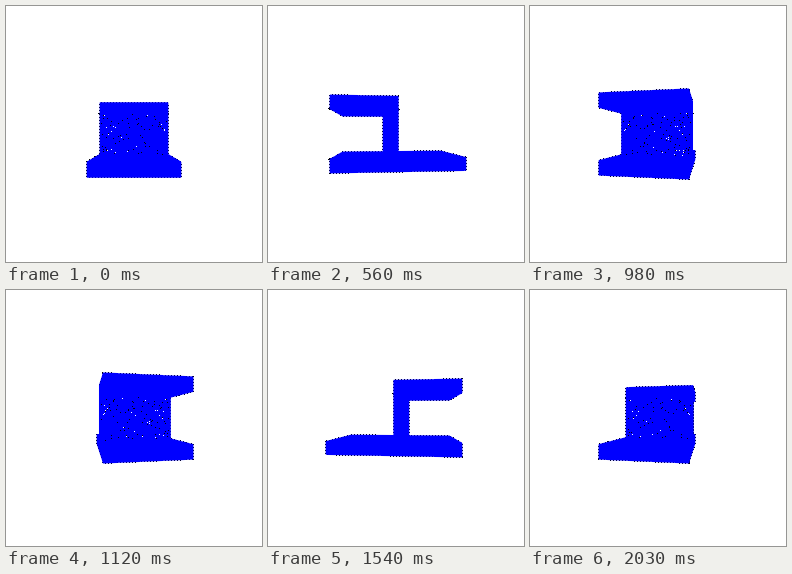
Recreate the animation shown at these times as an HTML page. Size 256 by 256 pixels, loop 2100 ms.

```html
<!DOCTYPE html>
<html lang="en">
<head>
<meta charset="utf-8">
<title>Rotating profile</title>
<style>
html, body { margin: 0; width: 100%; height: 100%; overflow: hidden; background: #fff; }
svg { display: block; width: 100vw; height: 100vh; }
</style>
</head>
<body>
<svg viewBox="0 0 256 256" shape-rendering="crispEdges">
  <path id="fringe" fill="none" stroke="#000" stroke-width="1.7" stroke-dasharray="1 2"/>
  <path id="solid" fill="#00f" stroke="#00f" stroke-width=".8" stroke-linejoin="round"/>
  <path id="dark" fill="#000"/>
  <path id="light" fill="#fff"/>
</svg>
<script>
const STEP_MS = 70, STEPS = 30;
const FOCAL = 212, DISTANCE = 3.75;
const LENGTH = 1.015, WIDTH = 0.605, TOP = 0.56, INNER = 0.36;
const WALL = [0.03, 0.2];

// Each box: [u range, height range, w range]
const boxes = [
  [[-LENGTH, LENGTH], [-TOP, -INNER], [-WIDTH, WIDTH]],
  [WALL, [-INNER, INNER], [-WIDTH, WIDTH]],
  [[WALL[0], LENGTH], [INNER, TOP], [-WIDTH, WIDTH]]
];
// Corner bits: 1 = u, 2 = height, 4 = w
const faces = [
  [0, 2, 6, 4], [1, 5, 7, 3], [0, 4, 5, 1],
  [2, 3, 7, 6], [0, 1, 3, 2], [4, 6, 7, 5]
];

let seed = 7;
function random() {
  seed = (seed * 16807) % 2147483647;
  return seed / 2147483647;
}

// Gaps in the wall's point coverage, opening as the surface grows on screen
const gaps = Array.from({ length: 240 }, () => ({
  h: (random() * 2 - 1) * INNER,
  w: (random() * 2 - 1) * WIDTH,
  limit: 2400 + 2400 * random(),
  light: random() < 0.2
}));

function project(u, h, w, angle) {
  const s = Math.sin(angle), c = Math.cos(angle);
  const scale = FOCAL / (DISTANCE + u * c + w * s);
  return { x: 128 + (w * c - u * s) * scale, y: 128 - h * scale, scale };
}

function signedArea(points) {
  return points.reduce((sum, p, i) => {
    const q = points[(i + 1) % points.length];
    return sum + p.x * q.y - q.x * p.y;
  }, 0);
}

function boxPath(box, angle) {
  const corners = Array.from({ length: 8 }, (_, i) =>
    project(box[0][i & 1], box[1][i >> 1 & 1], box[2][i >> 2], angle));
  return faces
    .map(face => face.map(i => corners[i]))
    .filter(points => signedArea(points) > 0)
    .map(points => "M" + points.map(p => p.x.toFixed(2) + " " + p.y.toFixed(2)).join("L") + "Z")
    .join("");
}

function gapPath(light, angle) {
  const facing = Math.cos(angle);
  const u = facing > 0 ? WALL[0] : WALL[1];
  return gaps.filter(gap => gap.light === light).map(gap => {
    const p = project(u, gap.h, gap.w, angle);
    return p.scale ** 2 * Math.abs(facing) > gap.limit
      ? `M${Math.floor(p.x)} ${Math.floor(p.y)}h1v1h-1z` : "";
  }).join("");
}

const setPath = (id, d) => document.getElementById(id).setAttribute("d", d);

function draw(time) {
  const step = Math.floor(time / STEP_MS) % STEPS;
  const angle = step / STEPS * 2 * Math.PI;
  const shape = boxes.map(box => boxPath(box, angle)).join("");
  setPath("fringe", shape);
  setPath("solid", shape);
  setPath("dark", gapPath(false, angle));
  setPath("light", gapPath(true, angle));
}

const start = performance.now();
function tick() {
  draw(performance.now() - start);
  requestAnimationFrame(tick);
}
tick();
</script>
</body>
</html>
```
